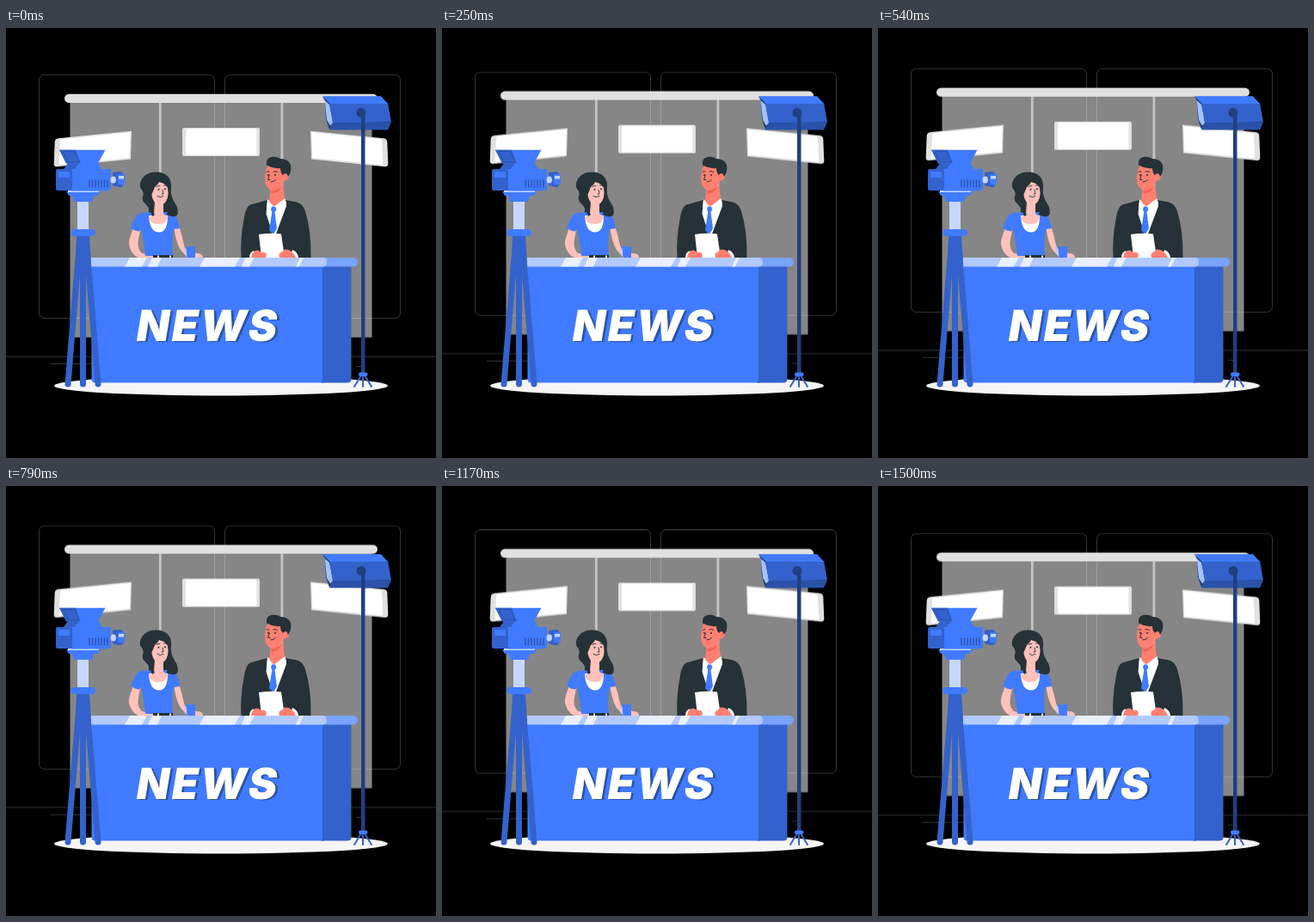
Animation, 500 px wide and 500 px high, one loop 1540 ms. Source, as an HTML page:

```html
<!DOCTYPE html>
<html lang="en">
<head>
<meta charset="utf-8">
<title>News studio</title>
<style>
  html, body { margin: 0; width: 100%; height: 100%; overflow: hidden; background: #000; }
  svg { display: block; width: 100vw; height: 100vh; }

  .blue { fill: #407bff; }
  .mid { fill: #3362cc; }
  .deep { fill: #2a52a9; }
  .navy { fill: #204080; }
  .pale { fill: #b3caff; }
  .ink { fill: #263238; }
  .white { fill: #fff; }
  .grey { fill: #e0e0e0; }
  .rose { fill: #ffc1ba; }
  .tan { fill: #ff8071; }
  .line { fill: none; stroke-linecap: round; stroke-linejoin: round; }
  .hair { stroke: #fff; stroke-opacity: .23; stroke-width: .9; fill: none; }

  .title { font: 900 50px Inter, "Liberation Sans", Arial, sans-serif; letter-spacing: 2.5px; }

  /* The set drifts up and down at 24 pictures a second. */
  .set { animation: drift 1540ms -8ms infinite; }
  @keyframes drift {
    0% { transform: translateY(0); animation-timing-function: steps(17, end); }
    45.946% { transform: translateY(-9.4px); animation-timing-function: steps(20, end); }
    100% { transform: translateY(1.2px); }
  }
</style>
</head>
<body>
<svg viewBox="0 0 500 500" xmlns="http://www.w3.org/2000/svg">
  <defs>
    <g id="panel">
      <path class="grey" d="M61 128.3L146 119.7L145 152.6L59.5 161.2Q55.5 161.5 55.7 157.5L56.7 132.5Q57 128.7 61 128.3Z"/>
      <path class="white" d="M66 129.3L144.5 121.3L143.7 151L64 159Q61.5 159.2 61.7 156.5L63 132Q63.2 129.5 66 129.3Z"/>
    </g>
  </defs>

  <g class="set">
    <path fill="#868686" d="M74.5 82H425.5V359.7H74.5Z"/>
    <g class="hair">
      <rect x="38.5" y="54.5" width="204" height="283" rx="6"/>
      <rect x="254.5" y="54.5" width="204" height="283" rx="6"/>
      <path d="M0 382H500M52 390.5H100M407 393.5H413"/>
    </g>
    <path stroke="#c4c4c4" stroke-width="2.8" d="M179.3 86V270M320.9 86V270"/>
    <rect class="grey" x="68" y="76.7" width="364" height="10.4" rx="5.2"/>
    <rect class="grey" x="205" y="116" width="90" height="33" rx="2"/>
    <rect class="white" x="209" y="117.3" width="82.5" height="30.4" rx="1.5"/>
    <use href="#panel"/>
    <use href="#panel" transform="matrix(-1 0 0 1 500 0)"/>
  </g>

  <ellipse cx="250" cy="416" rx="194" ry="11.5" fill="#f5f5f5"/>

  <g id="woman">
    <path class="ink" d="M157 187C153 179 161 167 174 167.5C186 167 193.5 175 192 186C191 196 195 201 198.5 207C201 214 200 219 196 219.500Q190 220 186 216H174L171 219.500Q165 218 166 210C165 205 157 203 159 196Q161 191 157 187Z"/>
    <path class="rose" d="M148 232C145 241 142.500 247 143 252C145 260 149 265 154 267H172Q170 262.500 163 263L157.500 261.500C152 255 153 249 156 236Z"/>
    <path class="rose" d="M195 231C197 243 199 251 203 258L211 267H229Q229 262 222 262L210 259C206 254 206 243 201 231Z"/>
    <path class="blue" d="M165 214.500C158 214.500 153 216 151 219L145 232Q149 236 155 236.500L157 233Q161 250 162 265H194Q192 248 195 234L202 233Q200 220 195 216Q191 214 186 214Z"/>
    <path class="white" d="M166 218Q167 237.500 178 237.500Q188 237.500 188 218Z"/>
    <path class="rose" d="M173 202L172 216Q170 220 166 219Q167 228 178 228Q187 228 188 219L183 216V202Z"/>
    <path class="ink" d="M186 203Q189 211 187 217Q192 220 197 219L194 201ZM169 198Q167 207 173 217L170 219L164 203Z"/>
    <path class="rose" d="M169 188Q174 183 178 179Q186 181 188 186Q190 198 184 204Q179 208 173 203Q169 198 169 188Z"/>
    <path class="ink" d="M167 198Q171 191 173 185Q177 182 179 177L168 176Z"/>
    <g class="line" stroke="#263238" stroke-width=".9">
      <path d="M175 184.500Q177 182.500 179 183.500M183.500 183Q185 182 186.500 183.500"/>
      <path d="M182 188L183 193H181M176 195.500Q179 198 183 195.500"/>
    </g>
    <circle class="ink" cx="177.500" cy="187.800" r="1"/>
    <circle class="ink" cx="185" cy="187.300" r="1"/>
    <path class="ink" d="M171 264H194V267.500H171Z"/>
    <path class="grey" d="M176 264.500h2v3h-2zM190 264.500h2v3h-2z"/>
    <path class="line" stroke="#b3caff" stroke-width="1.300" d="M210.500 257Q207 257 207.500 260.500Q208 264 211 264"/>
    <path class="blue" d="M209.500 254H220V267H210.500Z"/>
  </g>

  <g id="man">
    <path class="ink" d="M304 200L284 205.500Q279 208 277 220Q272 246 273.500 267H354.500Q355 236 348 213Q345 204 338 202.500L325 200Z"/>
    <path class="white" d="M304 200L302.500 216L310 239L313 242L326 207L325 200Z"/>
    <path class="tan" d="M308 185L306 201Q309 207 313 207Q321 204 324 198L322 183Z"/>
    <path class="white" d="M304 199L303 211L310 207.500ZM324.500 198L312 207.500L318 213L326 205Z"/>
    <path class="blue" d="M309 207.500L313 207.500L314.500 211L312.500 214L315 233L311 240L306 235L309.300 214L308 211Z"/>
    <path class="tan" d="M303 163Q299 176 303 184Q307 190 314 189Q321 187 323 178Q329 177 329.500 171Q329 165 324 166L320 160H304Z"/>
    <path class="ink" d="M304 162Q301 154 306 151Q313 148 319 152Q328 152 331 159Q332.500 167 328 173Q326 166 322 171Q319 168 319 163Q311 164 304 160Z"/>
    <path fill="#f66255" d="M308 189Q316 189 320 184Q319 191 309 193Z"/>
    <path class="line" stroke="#263238" d="M303 167.500Q304.500 166 306 167M311 167Q313 165.500 315.500 167.500M306.500 171L304.500 176.500H307M308 179Q311 179.500 313.500 176.500"/>
    <circle class="ink" cx="305" cy="171" r="1"/>
    <circle class="ink" cx="313" cy="171" r="1"/>
    <path class="white" d="M294 240Q308 238 320 239.500L324 267H297Z"/>
    <path class="white" d="M283 267Q283 261 288 259L291 267ZM340 267Q339 260 333 258L330 267Z"/>
    <path class="tan" d="M285 267Q286 258 293 258.500Q296 261 301 261Q304 263 302 267ZM318 267Q316 262 320 261L324 257.500Q333 257 337 267Z"/>
    <path class="line" stroke="#f66255" stroke-width=".8" d="M296 263L299 266M325 263L323 266"/>
  </g>

  <g id="desk">
    <path class="blue" d="M99.500 276H370V412.600H104Q99.500 412.600 99.500 408.500Z"/>
    <path class="mid" d="M368 276H401.500V408.500Q401.500 412.600 397 412.600H366Q368 411 368 408Z"/>
    <rect x="340" y="267" width="69" height="10.500" rx="5.200" fill="#79a3ff"/>
    <path class="pale" d="M96 267H368Q373 267 373 272.200Q373 277.500 368 277.500H96Z"/>
    <path fill="#e9f0ff" d="M144 267h20l-6 10.500h-20zM170 267h11l-5 10.500h-11zM231 267h41l-6 10.500h-41zM278 267h11l-6 10.500h-9zM342 267h4l-5 10.500h-4z"/>
    <g class="title" transform="translate(149.500 363.500) skewX(-9.500)">
      <text class="deep" x="2.800" y="1.500">NEWS</text>
      <text class="white">NEWS</text>
    </g>
  </g>

  <g id="lamp">
    <path class="navy" d="M413 98H417.500V403H413Z"/>
    <path class="line" stroke="#3362cc" stroke-width="2" d="M413 404L405 417M417 404L425 417M415 404V417"/>
    <rect class="blue" x="410" y="400.500" width="10.500" height="4.500" rx="2"/>
    <path class="navy" d="M368 79.300L377 87L382 110L376 118L372 106L371 85Z"/>
    <path fill="#a5c1ff" d="M370.800 84.500L376 89L380.500 110L377 113.500L373 107Z"/>
    <path class="mid" d="M376 87H444L448 109.500L380 111Z"/>
    <path class="deep" d="M380 110L448 109.500L444 118.500H376Z"/>
    <path class="blue" d="M368 79.300H436L444 88H377Z"/>
    <circle class="navy" cx="413" cy="98.500" r="5.500"/>
    <path class="navy" d="M413 98H417.500V120H413Z"/>
  </g>

  <g id="camera">
    <path class="mid" d="M82 241H97L99 275H81Z"/>
    <path class="line" stroke="#3362cc" stroke-width="7" d="M86 244L72 414M93 244L107 414M89.500 244V414"/>
    <path fill="#c5d7ff" d="M83 200H96V236H83Z"/>
    <rect class="blue" x="75.500" y="234" width="28.500" height="8" rx="4"/>
    <path class="blue" d="M70 190H110L107 195H102L100 202H79L77 195H73Z"/>
    <path fill="#c5d7ff" d="M72 189H108V191H72Z"/>
    <path class="blue" d="M76 165L83 156H107L112 164H122V188Q116 190 110 189.500H76Z"/>
    <rect class="mid" x="58" y="164" width="19" height="25" rx="2"/>
    <rect class="blue" x="61" y="167" width="13" height="7" rx="1"/>
    <path class="mid" d="M67 164L73 156H86L80 164Z"/>
    <path class="blue" d="M62 141.800H115.500L107 157.500H70Z"/>
    <path class="mid" d="M62 141.800H81L87 157.500H70Z"/>
    <path class="line" stroke="#2a52a9" d="M66 143.500H80L85 156H73Z"/>
    <path class="line" stroke="#2d56b3" stroke-width="1.500" stroke-linecap="butt" d="M97 177v8M100.500 177v8M104 177v8M107.500 177v8M111 177v8M114.500 177v8M118 177v8"/>
    <path class="mid" d="M124 168L133 167Q137 167 137 176Q137 185 133 185.500L124 183Z"/>
    <path class="blue" d="M130 170H138V182H130Z"/>
    <ellipse fill="#c5d7ff" cx="124.800" cy="176.500" rx="3.200" ry="4"/>
    <path fill="#c5d7ff" d="M131 172H137V175.500H131Z"/>
  </g>
</svg>
</body>
</html>
```
